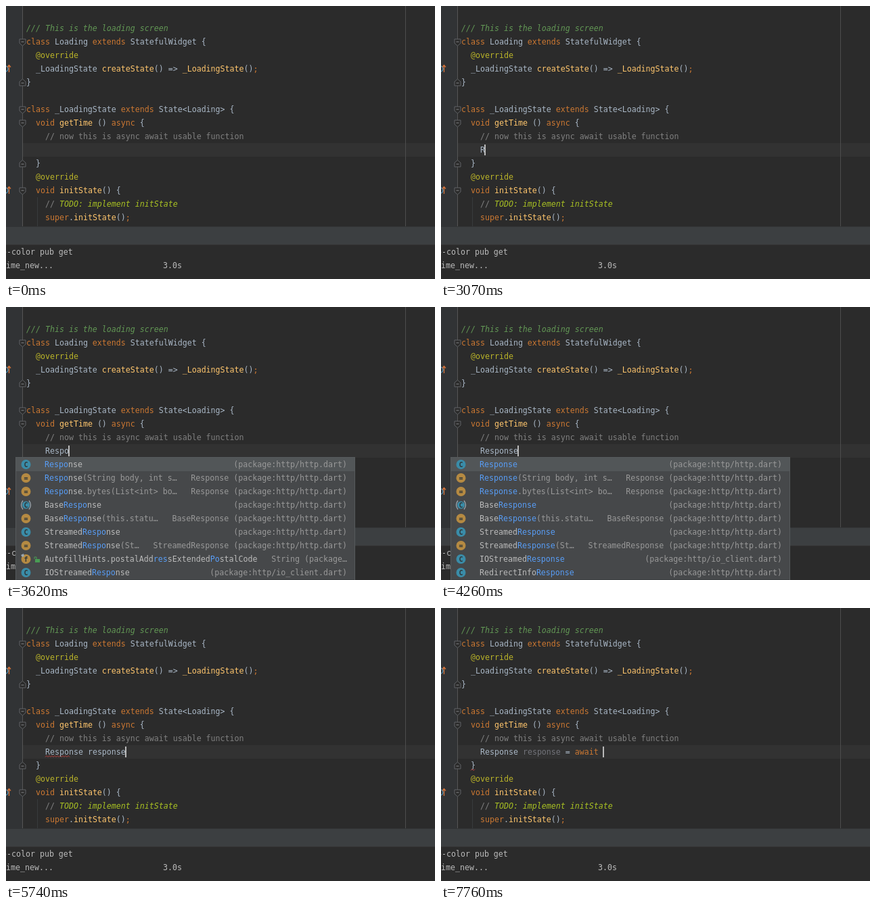
These frames come from a looping animation (634 px wide and 404 px high, 8 s). An HTML page:

```html
<!DOCTYPE html>
<html lang="en">
<head>
<meta charset="utf-8">
<title>Code editor</title>
<style>
  html, body { margin: 0; width: 100%; height: 100%; overflow: hidden; background: #2b2b2b; }
  #stage {
    position: relative; width: 634px; height: 404px; overflow: hidden;
    font: 11.627px/20px "DejaVu Sans Mono", "Noto Sans Mono", monospace;
    color: #a9b7c6; white-space: pre;
  }
  #stage > *, .row > * { position: absolute; }
  #gutter { left: 0; top: 0; width: 24px; height: 326px; background: #313335; border-right: 1px solid #555; }
  #band { left: 25px; top: 203px; width: 609px; height: 20px; background: #323232; }
  #margin { left: 590px; top: 0; width: 1px; height: 326px; background: #4d4d4d; }
  #guide { left: 46px; top: 283px; width: 1px; height: 43px; background: #393b3c; }
  #marks { left: 0; top: 0; }
  #bar { left: 0; top: 326px; width: 634px; height: 26px; background: #3c3f41; border-top: 1px solid #323435; border-bottom: 1px solid #323232; }
  #code { left: 30px; top: 23px; }
  #line { left: 58px; top: 203px; }
  .out { color: #bbb; }
  .k { color: #cc7832; }
  .f { color: #ffc66d; }
  .a { color: #bbb529; }
  .c { color: #808080; }
  .d { color: #629755; font-style: italic; }
  .t { color: #a8c023; font-style: italic; }
  .u { color: #72737a; }
  #caret { top: 205px; width: 2px; height: 16px; background: #bbb; }
  #cursor { left: -13px; top: -13px; }
  .popup { top: 222px; box-sizing: border-box; background: #46484a; border: 1px solid #565a5c; overflow: hidden; color: #bbb; }
  .row { position: relative; height: 20px; }
  .row.on { background: #525658; }
  .row svg { left: 6px; top: 1px; }
  .row .name { left: 42px; top: 0; }
  .row .type { right: 11px; top: 0; color: #999; }
  .row .arg { color: #999; }
  .row b { font-weight: normal; color: #589df6; }
  .tip { height: 22px; padding-left: 5px; background: #3c3f41; color: #999; font: 11px/21px "Open Sans", "Noto Sans", sans-serif; }
  .tip i { font-style: normal; color: #589df6; }
  #list { left: 14px; width: 502px; height: 206px; }
  #names { left: 117px; width: 251px; height: 44px; }
  #names .name { left: 4px; }
  #words { left: 154px; width: 480px; height: 44px; }
</style>
</head>
<body>
<div id="stage">
  <div id="gutter"></div>
  <div id="band"></div>
  <div id="margin"></div>
  <div id="guide"></div>
  <div id="code"><span class="d">/// This is the loading screen</span>
<span class="k">class</span> Loading <span class="k">extends</span> StatefulWidget {
  <span class="a">@override</span>
  _LoadingState <span class="f">createState</span>() =&gt; <span class="f">_LoadingState</span>()<span class="k">;</span>
}

<span class="k">class</span> _LoadingState <span class="k">extends</span> State&lt;Loading&gt; {
  <span class="k">void</span> <span class="f">getTime</span> () <span class="k">async</span> {
    <span class="c">// now this is async await usable function</span>

  }
  <span class="a">@override</span>
  <span class="k">void</span> <span class="f">initState</span>() {
    <span class="c">// </span><span class="t">TODO: implement initState</span>
    <span class="k">super</span>.<span class="f">initState</span>()<span class="k">;</span></div>
  <svg id="marks" width="634" height="326" fill="none">
    <defs>
      <g id="fold"><path d="M-4.5-4.5h9v6l-4.5 4-4.5-4z" fill="#2b2b2b" stroke="#606366"/><path d="M-2-.5h4" stroke="#858789"/></g>
      <g id="over"><circle cx="-1" r="4" stroke="#4a88a8" stroke-width="1.5"/><path d="M4.5 5v-10M2-2.5l2.5-3 2.5 3" stroke="#d9753a" stroke-width="1.3"/></g>
    </defs>
    <g id="folds"></g>
    <use href="#over" y="93"/>
    <use href="#over" y="273"/>
    <path id="wave" stroke="#bc3f3c"/>
    <path id="wave2" stroke="#bc3f3c"/>
  </svg>
  <div id="line"></div>
  <div id="caret"></div>
  <div id="bar"></div>
  <div class="out" style="left:-13px;top:354px">no-color pub get</div>
  <div class="out" style="left:-7px;top:374px">time_new...</div>
  <div class="out" style="left:232px;top:374px">3.0s</div>
  <div id="list" class="popup"></div>
  <div id="names" class="popup"></div>
  <div id="words" class="popup"></div>
  <svg id="cursor" width="30" height="26" fill="none">
    <circle cx="13" cy="13" r="12" fill="#958e1c"/>
    <path d="M12 6.5h3m2 0h3M12 20.5h3m2 0h3M16 7v13" stroke="#e4e4d8"/>
  </svg>
</div>
<script>
const $ = id => document.getElementById(id);
const LOOP = 8000;
const HTTP = '(package:http/http.dart)';

// what stands on the edited line, and from when
const typed = [
  [0, ''], [3070, 'R'], [3230, 'Re'], [3350, 'Res'], [3490, 'Resp'], [3620, 'Respo'],
  [3850, 'Respon'], [4110, 'Respons'], [4260, 'Response'], [4880, 'Response '],
  [5270, 'Response r'], [5420, 'Response re'], [5740, 'Response response'],
  [6060, 'Response response '], [6440, 'Response response ='], [6600, 'Response response = '],
  [6760, 'Response response = a'], [6930, 'Response response = aw'],
  [7100, 'Response response = awa'], [7270, 'Response response = awai'],
  [7440, 'Response response = await'], [7520, 'Response response = await ']
];

// icon, name, arguments, type
const entries = [
  ['C', 'Response', '', HTTP],
  ['=', 'Response', '(String body, int s…', 'Response ' + HTTP],
  ['=', 'Response', '.bytes(List<int> bo…', 'Response ' + HTTP],
  ['(C)', 'BaseResponse', '', HTTP],
  ['=', 'BaseResponse', '(this.statu…', 'BaseResponse ' + HTTP],
  ['C', 'StreamedResponse', '', HTTP],
  ['=', 'StreamedResponse', '(St…', 'StreamedResponse ' + HTTP],
  ['f', 'AutofillHints.postalAddressExtendedPostalCode', '', 'String (package…'],
  ['C', 'IOStreamedResponse', '', '(package:http/io_client.dart)'],
  ['C', 'RedirectInfoResponse', '', HTTP]
];

const path = [
  [70, 474, 350], [330, 425, 215], [560, 320, 108], [800, 210, 150],
  [1070, 165, 209], [1130, 165, 211], [1330, 162, 285], [1600, 160, 420]
];

const esc = s => s.replace(/</g, '&lt;');
const during = (t, from, to) => t >= from && t < to;
const show = (el, on) => { el.style.visibility = on ? 'visible' : 'hidden'; };

function icon(kind) {
  const fill = kind.includes('C') ? '#3a8ca8' : '#b58a42';
  let art = `<circle cx="8.5" cy="9" r="${kind === '(C)' ? 5.5 : 7}" fill="${fill}"/>`;
  if (kind === '(C)') art += '<path d="M4 2.5q-5 6.5 0 13M13 2.5q5 6.5 0 13" fill="none" stroke="#9aa7b0" stroke-width="1.3"/>';
  if (kind === 'f') art += '<path d="M1 3l4-2 1 4-3 1z" fill="#9aa7b0"/><path d="M22 9h7v5h-7z" fill="#499c54"/><path d="M21 9v-3h3v3" fill="none" stroke="#499c54"/>';
  const letter = kind === '(C)' ? 'C' : kind;
  return `<svg width="32" height="18">${art}<text x="8.5" y="12.5" font-size="10" font-weight="bold" text-anchor="middle" fill="#2f3638">${letter}</text></svg>`;
}

function row(i, [kind, name, args, type], part) {
  let text = name.replace(part, '<b>$&</b>');
  if (kind === 'f') text = name.replace(/res|Po/g, '<b>$&</b>');
  return `<div class="row${i ? '' : ' on'}">${kind ? icon(kind) : ''}<span class="name">${text}<span class="arg">${esc(args)}</span></span><span class="type">${type}</span></div>`;
}

const tip = '<div class="tip">Press Enter to insert, Tab to replace  <i>Next Tip</i></div>';

function colour(s) {
  return s.replace(/ response(?= )/, m => now >= 6130 ? `<span class="u">${m}</span>` : m)
    .replace(/await/, '<span class="k">await</span>');
}

function zigzag(x, end, y) {
  let d = `M${x} ${y}`;
  for (let i = 1; x + 2 * i <= end; i++) d += `L${x + 2 * i} ${y - (i % 2) * 2}`;
  return d;
}

// smooth curve through the path points
function along(t) {
  let i = path.findIndex(p => p[0] > t) - 1;
  if (i < 0) return null;
  const at = n => path[Math.max(0, Math.min(path.length - 1, n))];
  const [p, a, b, q] = [at(i - 1), at(i), at(i + 1), at(i + 2)];
  const u = (t - a[0]) / (b[0] - a[0]);
  return [1, 2].map(k => a[k] + u * (b[k] - p[k] + u * (2 * p[k] - 5 * a[k] + 4 * b[k] - q[k] + u * (3 * (a[k] - b[k]) + q[k] - p[k]))) / 2);
}

$('folds').innerHTML = [[53, 1], [113, -1], [153, 1], [173, 1], [233, -1], [273, 1]]
  .map(([y, s]) => `<use href="#fold" transform="translate(24.5 ${y + .5}) scale(1 ${s})"/>`).join('');
$('wave').setAttribute('d', zigzag(58, 94, 220.5));
$('wave2').setAttribute('d', zigzag(44, 51, 240.5));

let now = 0, last = '';

function draw(t) {
  now = t;
  const text = typed.filter(e => e[0] <= t).pop()[1];
  const key = text + (t >= 6130);
  if (key !== last) {
    last = key;
    $('line').innerHTML = colour(text);
    const rows = entries.filter(e => text.length > 5 ? e[0] !== 'f' : e !== entries[9]);
    $('list').innerHTML = rows.map((e, i) => row(i, e, text)).join('') + tip;
    const word = text.split(' ').pop();
    $('names').innerHTML = row(0, ['', 'response', '', ''], word) + tip;
    $('words').innerHTML = row(0, ['', 'await', '', ''], word) + tip;
    $('caret').style.left = 57 + 7 * text.length + 'px';
  }
  show($('caret'), during(t, 1550, 2080) || t >= 2610);
  show($('list'), during(t, 3230, 4580));
  show($('names'), during(t, 5270, 5740));
  show($('words'), during(t, 6930, 7520));
  show($('wave'), during(t, 4960, 6130));
  show($('wave2'), t >= 7760);
  const pos = along(t);
  show($('cursor'), pos);
  if (pos) $('cursor').style.transform = `translate(${pos[0]}px, ${pos[1]}px)`;
}

const start = performance.now();
function tick() {
  draw((performance.now() - start) % LOOP);
  requestAnimationFrame(tick);
}
tick();
</script>
</body>
</html>
```
